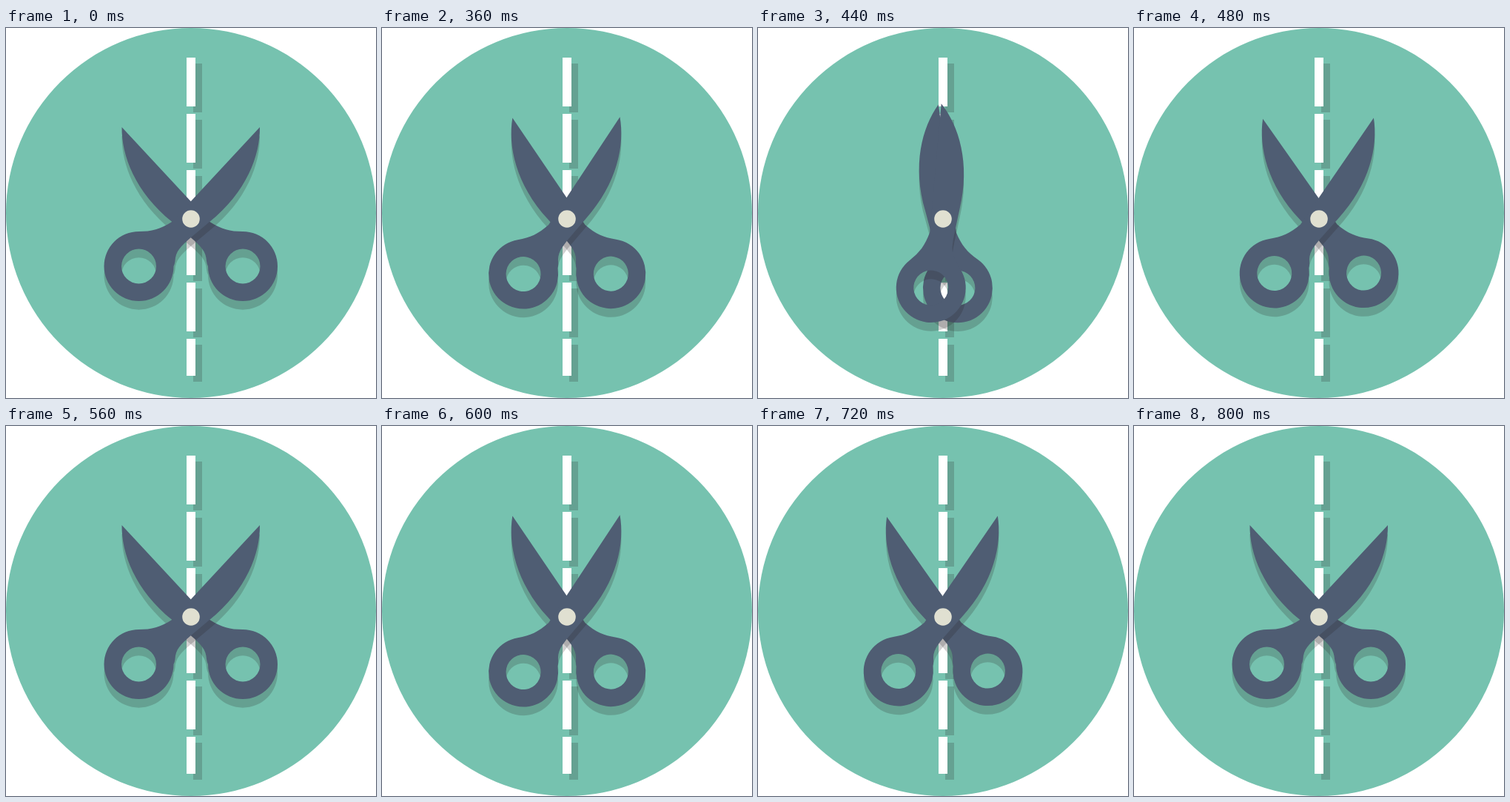
Write an HTML page that moves like this. It is 500 by 500 pixels and loops after 1400 ms.

```html
<!DOCTYPE html>
<html lang="en">
<head>
<meta charset="utf-8">
<title>Scissors</title>
<style>
  html, body { margin: 0; width: 100%; height: 100%; overflow: hidden; background: #fff; }
  svg { display: block; width: 100%; height: 100%; }
  .shade { fill: #231f20; opacity: .2; }
  .metal { fill: #4f5d73; }
  .cut { fill: none; stroke: #fff; stroke-width: 12; stroke-dasharray: 66 10; }
  .cut.dim { stroke: #231f20; opacity: .2; }
</style>
</head>
<body>
<svg viewBox="0 0 500 500">
  <defs>
    <path id="half" fill-rule="evenodd" d="M343 134
      C343.5 172 325 222 275 262
      L250 283
      C236 295 229 302 228.5 315
      Q228 319 226.5 322
      A47 47 0 1 1 179.5 275
      C197 275 208 272 224 262 Z
      M203 322 a23.5 23.5 0 1 0 -47 0 a23.5 23.5 0 1 0 47 0 Z"/>
    <use id="mirrored" href="#half" transform="translate(499.5 0) scale(-1 1)"/>
  </defs>
  <circle cx="250" cy="250" r="250" fill="#76c2af"/>
  <path class="cut dim" d="M259 48V478"/>
  <path class="cut" d="M250 40V470"/>
  <g class="shade" transform="translate(0 11.7)"><use class="back" href="#mirrored"/></g>
  <g class="metal"><use class="back" href="#mirrored"/></g>
  <g class="shade" transform="translate(0 11.7)"><use class="front" href="#half"/></g>
  <g class="metal"><use class="front" href="#half"/></g>
  <circle cx="250" cy="258" r="11.8" fill="#e0e0d1"/>
</svg>
<script>
  const LOOP = 1400, START = 320, STEP = 40, SNIP = 6, SNIPS = 2;
  const back = document.querySelectorAll('.back');
  const front = document.querySelectorAll('.front');

  // 0 = open, 1 = closed; each snip closes for three steps and opens for three
  function closure(time) {
    const step = Math.floor((time - START) / STEP);
    if (step < 0 || step >= SNIP * SNIPS) return 0;
    const phase = step % SNIP;
    if (phase <= 3) return (1 - Math.cos(Math.PI * phase / 3)) / 2;
    return Math.pow((SNIP - phase) / 3, 3.7);
  }

  function turn(parts, angle, x, y) {
    parts.forEach(p => p.setAttribute('transform', `rotate(${angle} ${x} ${y})`));
  }

  function draw(time) {
    const k = closure(time);
    turn(back, 35 * k, 248.5, 257.2);
    turn(front, -37.8 * k, 249, 257.3);
  }

  const begin = performance.now();
  function tick() {
    draw((performance.now() - begin) % LOOP);
    requestAnimationFrame(tick);
  }
  tick();
</script>
</body>
</html>
```
